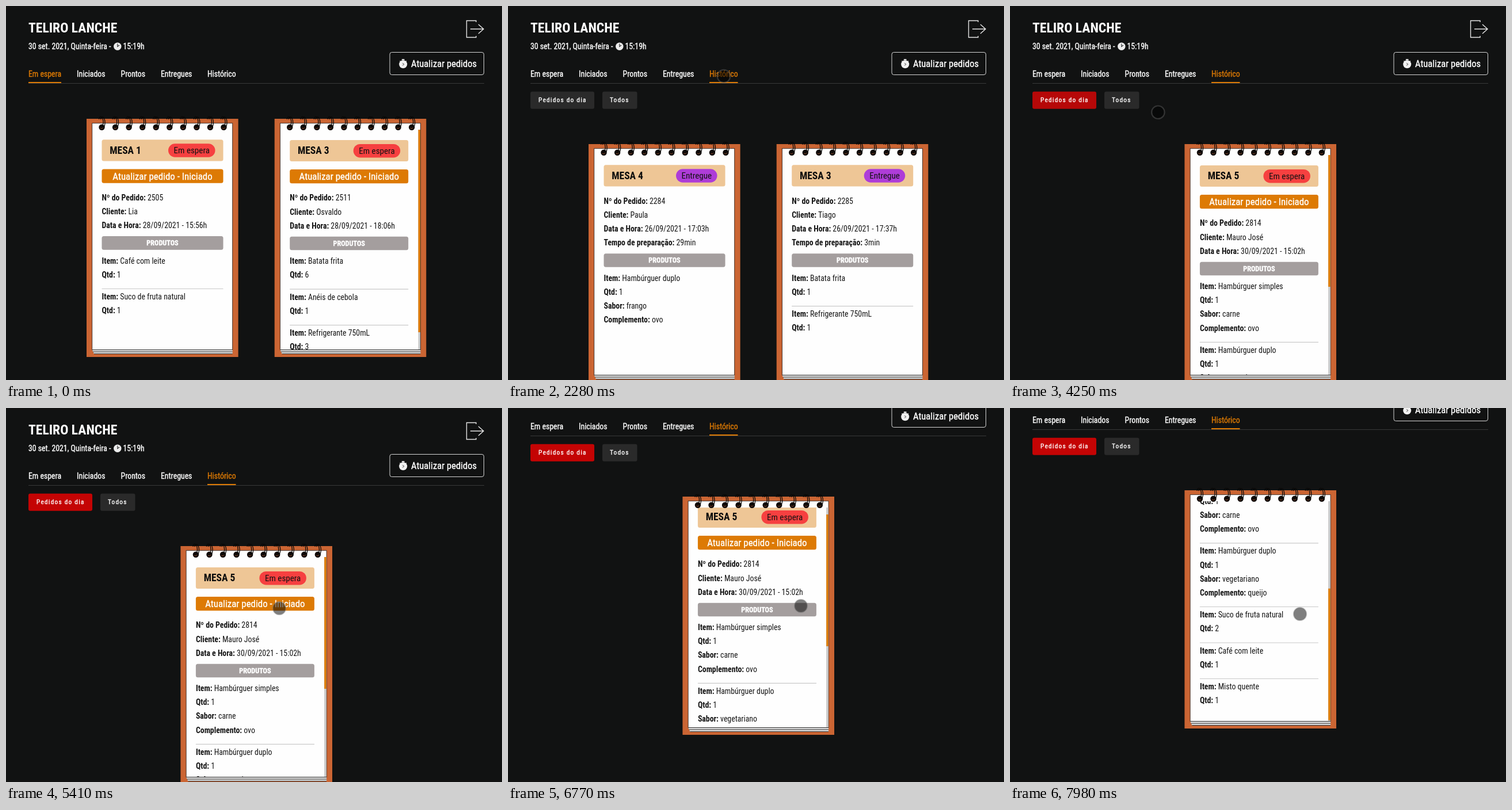
An HTML page for the animation above (8 s loop, 862x650 px).

```html
<!DOCTYPE html>
<html lang="pt-BR">
<head>
<meta charset="utf-8">
<title>Pedidos</title>
<style>
html, body { margin: 0; width: 100%; height: 100%; overflow: hidden; background: #111212; }
svg { display: block; width: 100%; height: 100%; }
text { font-family: 'Roboto Condensed', Roboto, sans-serif; font-stretch: 75%; white-space: pre; }
.b { font-weight: 700; }
.m { stroke-width: .35; }
</style>
</head>
<body>
<svg id="stage" viewBox="0 0 862 650"></svg>
<script>
const stage = document.getElementById('stage');
const $ = id => document.getElementById(id);
const LOOP = 8000, ROW = 24.1, ORANGE = '#dd7a04';

// Without a condensed face, regular Roboto is narrowed to its proportions.
function faceScale() {
  const sample = 'Atualizar pedidos 2021';
  stage.innerHTML = `<text font-size="40">${sample}</text>` +
    `<text font-size="40" style="font-family:Roboto,sans-serif;font-stretch:100%">${sample}</text>`;
  const [a, b] = [...stage.children].map(n => n.getComputedTextLength());
  return a / b > 0.95 ? 0.88 : 1;
}
const narrow = faceScale();

const text = (x, y, size, str, attrs = '') =>
  `<text transform="translate(${x} ${y}) scale(${narrow} 1)" font-size="${size}" ${attrs}>${str}</text>`;
const rect = (x, y, w, h, fill, rx = 0, attrs = '') =>
  `<rect x="${x}" y="${y}" width="${w}" height="${h}" rx="${rx}" fill="${fill}" ${attrs}/>`;
const path = (d, stroke, width, attrs = '') =>
  `<path d="${d}" fill="none" stroke="${stroke}" stroke-width="${width}" ${attrs}/>`;
const circle = (x, y, r, fill, attrs = '') =>
  `<circle cx="${x}" cy="${y}" r="${r}" fill="${fill}" ${attrs}/>`;

const MID = 'text-anchor="middle" ';
// Medium weight: regular glyphs with a hairline outline.
const medium = color => `class="m" fill="${color}" stroke="${color}" `;
const STATUS = {
  'Em espera': { fill: '#f64040', w: 81.5 },
  'Entregue': { fill: '#ae3cd8', w: 71.5 }
};

function header() {
  return text(39, 46, 23.6, 'TELIRO LANCHE', 'class="b" fill="#fff"') +
    text(39, 75, 13.8, '30 set. 2021, Quinta-feira -', medium('#fff')) +
    circle(193.8, 70.2, 6.7, '#ececec') + path('M193.8 65.5V70.5L197 68', '#333', 1.2) +
    text(203.5, 75, 13.8, '15:19h', medium('#fff')) +
    path('M817 28V25.5H800.5V54.5H817V52M807 40H830M821 32L830 40L821 48', '#e6e6e6', 1.4) +
    rect(667, 80.5, 163.5, 39, 'none', 3.5, 'stroke="#d5d5d5"') +
    circle(690.2, 101.3, 7, '#f1f1f1') + rect(687.7, 92.3, 5, 2, '#f1f1f1', 1) +
    path('M684.5 95.5l1.8 1.8M695.9 95.5l-1.8 1.8', '#f1f1f1', 1.4) +
    path('M689 99.3L692 101.3L689 103.3', '#555', 1) +
    text(704, 106, 16.6, 'Atualizar pedidos', medium('#fff')) +
    path('M39 134.5H831', '#383939', 1);
}

const TABS = [['Em espera', 39, 57], ['Iniciados', 123, 49], ['Prontos', 199.5, 42],
  ['Entregues', 269, 54], ['Histórico', 350, 49.5]];
const tabs = active => TABS.map(([name, x, w], i) =>
  text(x, 122.5, 13.8, name, medium(i === active ? ORANGE : '#fff')) +
  (i === active ? rect(x, 132, w, 2, ORANGE) : '')).join('');

const filters = id =>
  rect(39, 148.7, 111, 30, '#2a2a2a', 3, `id="${id}"`) + rect(164, 148.7, 60.5, 30, '#2a2a2a', 3) +
  text(53, 167.3, 11.3, 'Pedidos do dia', medium('#fff') + 'letter-spacing="1.25"') +
  text(177, 167.3, 11.3, 'Todos', medium('#fff') + 'letter-spacing="1.25"');

const field = ([label, value], y) =>
  text(26.5, y, 13.8, `<tspan class="b">${label}:</tspan> ${value}`, 'fill="#151515"');

function content(o) {
  const w = o.thumb ? 206 : 211, mid = 26.5 + w / 2, s = STATUS[o.status];
  const right = 26.5 + w - 14;
  let y = 104, out = rect(26.5, 36.5, w, 37.2, '#eec696', 3.5) +
    text(40.3, 61, 17.5, 'MESA ' + o.table, 'class="b" fill="#0c0c0c"') +
    rect(right - s.w, 43.5, s.w, 23.5, s.fill, 11.7) +
    text(right - s.w / 2, 60.5, 15.1, o.status, MID + 'fill="#111"');
  if (o.status === 'Em espera') {
    out += rect(26.5, 87.6, w, 24.3, ORANGE, 3.5) +
      text(mid, 105.8, 16.9, 'Atualizar pedido - Iniciado', MID + medium('#fff'));
    y = 142;
  }
  const put = row => { out += field(row, y); y += ROW; };
  o.info.forEach(put);
  y -= ROW;
  out += rect(26.5, y + 14.1, w, 23.6, '#a49e9e', 3.5) +
    text(mid, y + 30.2, 12.2, 'PRODUTOS',
      MID + 'class="b" fill="#fff" stroke="#fff" stroke-width=".4"');
  y += 61.6;
  o.items.forEach(([item, qty, flavor, extra], i) => {
    if (i) out += path(`M26.5 ${y - 18.6}h${w}`, '#c9c9c9', 1.2);
    put(['Item', item]);
    put(['Qtd', qty]);
    if (flavor) put(['Sabor', flavor]);
    if (extra) put(['Complemento', extra]);
    y += 14.3;
  });
  return `<g transform="translate(0 ${o.thumb ? 0.4 : -0.2})">${out}</g>`;
}

function rings() {
  const wire = 'M-5 -14C-4 -19 -1 -20 1 -16C3.5 -11 3 -4 0 1';
  let out = '';
  for (let i = 0; i < 10; i++) {
    out += `<g transform="translate(${26.5 + i * 23.55} 14.8)">` +
      circle(0, 0, 5.2, '#100a08') + path('M-2.5 1.5Q0 3.5 2.5 .5', '#8a4a2c', 1) +
      path(wire, '#0a0908', 1.3) + path(wire, '#0a0908', 1.3, 'transform="translate(3 .4)"') + '</g>';
  }
  return out;
}

function card(x, y, id, o) {
  return `<g transform="translate(${x} ${y})">` +
    rect(0, 0, 263.6, 414, '#cb6533') +
    rect(9.7, 7.7, 244, 394, '#fefefe', 0, 'stroke="#332620" stroke-width=".9"') +
    `<clipPath id="${id}-clip"><rect x="10" y="19" width="243.5" height="382"/></clipPath>` +
    `<g clip-path="url(#${id}-clip)"><g id="${id}-body">${content(o)}</g></g>` +
    (o.thumb ? rect(249.8, 19, 3.5, 382, '#c8c8c8') +
      rect(249.8, 19, 3.5, o.thumb, ORANGE, 0, `id="${id}-thumb"`) : '') +
    '<path d="M9.7 401.5H253.7V408.5H13Z" fill="#dedede"/>' +
    path('M9.7 401.5H253.7M11 405H253.7M13 408.5H253.7', '#2c2c2c', 1) +
    rings() + '</g>';
}

const order = (table, status, number, client, date, items, extra = {}) => ({
  table, status, items, ...extra,
  info: [['Nº do Pedido', number], ['Cliente', client], ['Data e Hora', date],
    ...(extra.prep ? [['Tempo de preparação', extra.prep]] : [])]
});

const waiting = tabs(0) +
  card(140, 196, 'a', order(1, 'Em espera', 2505, 'Lia', '28/09/2021 - 15:56h',
    [['Café com leite', 1], ['Suco de fruta natural', 1]])) +
  card(466.7, 196, 'b', order(3, 'Em espera', 2511, 'Osvaldo', '28/09/2021 - 18:06h',
    [['Batata frita', 6], ['Anéis de cebola', 1], ['Refrigerante 750mL', 3]], { thumb: 352 }));

const past = tabs(4) + filters('idle') +
  card(140, 240, 'c', order(4, 'Entregue', 2284, 'Paula', '26/09/2021 - 17:03h',
    [['Hambúrguer duplo', 1, 'frango', 'ovo']], { prep: '29min' })) +
  card(466.7, 240, 'd', order(3, 'Entregue', 2285, 'Tiago', '26/09/2021 - 17:37h',
    [['Batata frita', 1], ['Refrigerante 750mL', 1]], { prep: '3min' }));

const today = tabs(4) + filters('picked') +
  card(303.4, 240, 'e', order(5, 'Em espera', 2814, 'Mauro José', '30/09/2021 - 15:02h',
    [['Hambúrguer simples', 1, 'carne', 'ovo'], ['Hambúrguer duplo', 1, 'vegetariano', 'queijo'],
      ['Suco de fruta natural', 2], ['Café com leite', 1], ['Misto quente', 1]], { thumb: 229 }));

stage.innerHTML = rect(0, 0, 862, 650, '#111212') +
  `<g id="page">${header()}` +
  [waiting, past, today].map((v, i) => `<g id="view${i}">${v}</g>`).join('') + '</g>' +
  `<g id="cursor">${circle(0, 0, 11.2, '#000', 'id="dot" fill-opacity=".5" stroke-width="2.2"')}</g>`;

// [time, ...values]
const POINTER = [[790, 826, 598], [1000, 690, 455], [1280, 455, 205], [1490, 375, 122],
  [3010, 375, 122], [3440, 134, 163], [3830, 134, 163], [4250, 259, 185], [4590, 421, 291],
  [4660, 421, 291], [5070, 475, 348], [5410, 475, 348], [5820, 788, 372], [5960, 788, 372],
  [6160, 759, 350], [6230, 735, 348], [6500, 509, 344], [7570, 509, 344], [7850, 504, 358]];
const PAGE = [[5890, 0], [5955, 32], [6023, 68], [6160, 86], [7920, 86], [7980, 97]];
const LIST = [[6769, 0], [6770, 20], [6905, 112], [7107, 220], [7310, 252.5]];
const MOVES = [[790, 1490], [2150, 2280], [3010, 3760], [3830, 4590], [4660, 5070],
  [5410, 6160], [6230, 6500], [6770, 7310], [7570, 7980]];

function along(track, t) {
  const n = track.findIndex(k => k[0] > t);
  if (n < 0) return track[track.length - 1].slice(1);
  if (n === 0) return track[0].slice(1);
  const a = track[n - 1], b = track[n], p = (t - a[0]) / (b[0] - a[0]);
  return a.slice(1).map((v, i) => v + (b[i + 1] - v) * p);
}

// Motion advances in steps of about 68 ms, like a screen recording.
function stepped(t) {
  const move = MOVES.find(([a, b]) => t >= a && t < b);
  if (!move) return t;
  const [a, b] = move, step = (b - a) / Math.round((b - a) / 68);
  return a + Math.floor((t - a) / step + 0.15) * step;
}

function draw(time) {
  const t = stepped(time);
  const view = t < 2200 ? 0 : t < 3600 ? 1 : 2;
  for (let i = 0; i < 3; i++) $('view' + i).style.display = i === view ? '' : 'none';
  const [scroll] = along(PAGE, t), [list] = along(LIST, t), [x, y] = along(POINTER, t);
  $('page').setAttribute('transform', `translate(0 ${-scroll})`);
  $('e-body').setAttribute('transform', `translate(0 ${-list})`);
  $('e-thumb').setAttribute('y', 19 + list * 0.601);
  $('picked').setAttribute('fill', t < 4300 ? '#b60808' : '#c40404');

  const click = (t >= 2150 && t < 2280) || (t >= 3440 && t < 3690);
  const dot = $('dot');
  $('cursor').style.display = t < 790 ? 'none' : '';
  $('cursor').setAttribute('transform', `translate(${x} ${y})`);
  dot.setAttribute('r', click ? 12.2 : 11.2);
  dot.setAttribute('fill', click ? '#bdb600' : '#000');
  dot.setAttribute('fill-opacity', click ? 0.68 : 0.5);
  dot.setAttribute('stroke', click ? 'rgba(190,184,20,.6)' : 'rgba(130,130,130,.34)');
}

function loop(now) {
  draw(now % LOOP);
  requestAnimationFrame(loop);
}
draw(0);
requestAnimationFrame(loop);
</script>
</body>
</html>
```
